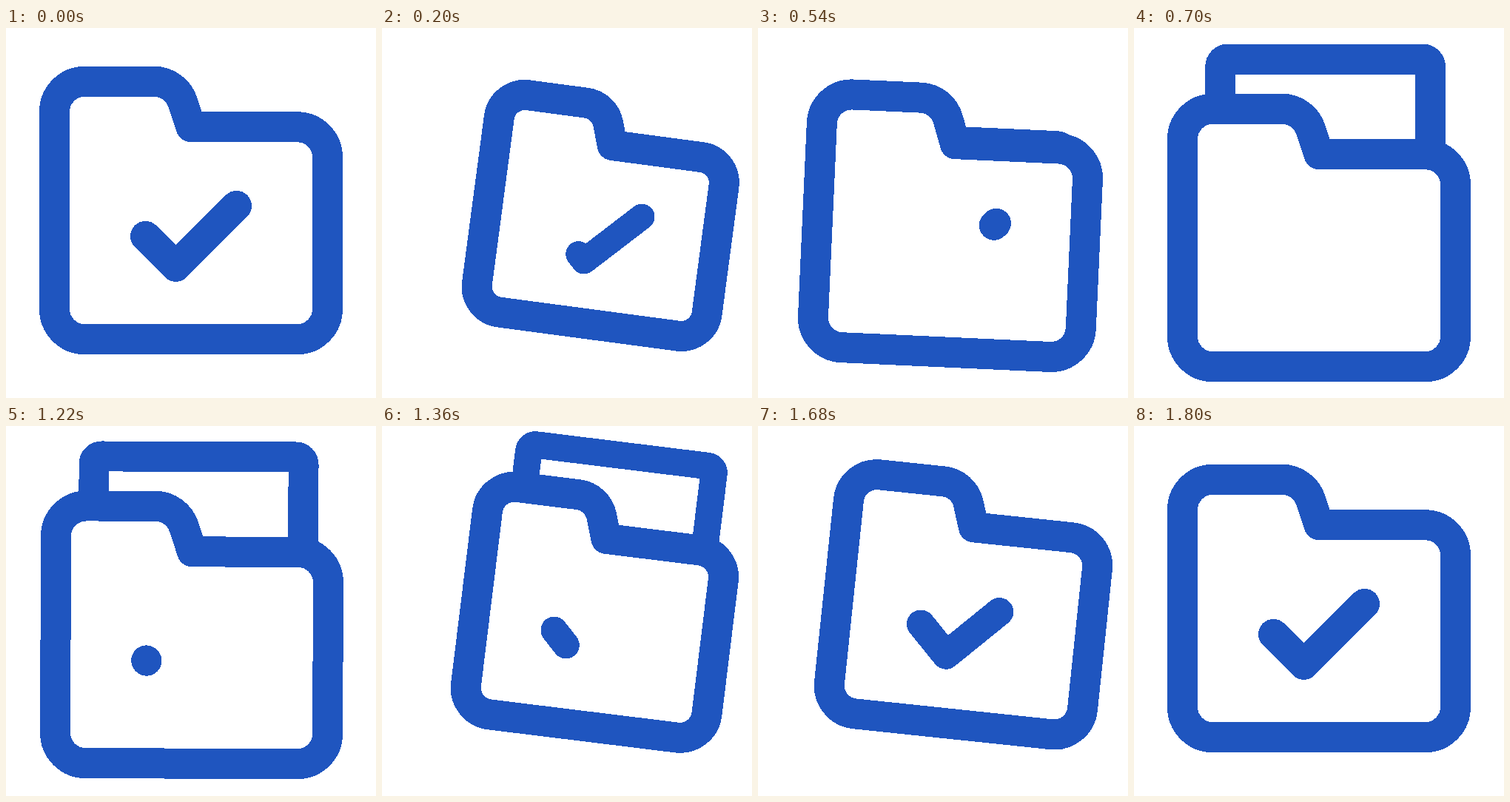
These frames come from a looping animation (500x500 px, 4.22 s). An HTML page:

```html
<!DOCTYPE html>
<html lang="en">
<head>
<meta charset="utf-8">
<title>Folder</title>
<style>
  html, body { margin: 0; width: 100%; height: 100%; overflow: hidden; background: #fff; }
  svg { display: block; width: 100%; height: 100%; }
  path { fill: none; stroke: #1f55bf; stroke-width: 2; stroke-linejoin: round; shape-rendering: crispEdges; }
</style>
</head>
<body>
<svg viewBox="0 0 500 500">
  <g id="icon">
    <path id="sheet" d="M5.5 5.7V.22a.5.5 0 0 1 .5-.5h12.84a.5.5 0 0 1 .5.5V5.7"/>
    <path id="folder" style="fill:#fff" d="M3 5a2 2 0 0 1 2-2h4.558a2 2 0 0 1 1.897 1.368L12 6h7a2 2 0 0 1 2 2v10a2 2 0 0 1-2 2H5a2 2 0 0 1-2-2z"/>
    <path id="tick" d="M9 13.2l2 2 4-4" pathLength="1" stroke-linecap="round"/>
  </g>
</svg>
<script>
const LOOP = 4220, CLOSE_AT = 1200, SWING = 600, UNIT = 20.5;
const [icon, sheet, folder, tick] =
  ['icon', 'sheet', 'folder', 'tick'].map(id => document.getElementById(id));

const clamp = x => Math.min(1, Math.max(0, x));
const sine = x => (1 - Math.cos(Math.PI * clamp(x))) / 2;
const ramp = (t, from, to) => sine((t - from) / (to - from));

// Cubic bezier easing, solved by bisection
const bezier = (x1, y1, x2, y2) => x => {
  const at = (u, a, b) => 3 * a * u * (1 - u) ** 2 + 3 * b * u * u * (1 - u) + u ** 3;
  let lo = 0, hi = 1;
  for (let i = 0; i < 24; i++) {
    const mid = (lo + hi) / 2;
    if (at(mid, x1, x2) < x) lo = mid; else hi = mid;
  }
  return at(lo, y1, y2);
};
const snap = bezier(.28, 0, .07, 1);

function draw(time) {
  const opening = time < CLOSE_AT;
  const t = opening ? time : time - CLOSE_AT;

  // Tilt and shrink around the bottom right corner, out and back
  const swing = clamp(Math.min(t, SWING - t) / (SWING / 2));
  const scale = 1 - .2 * sine(swing);
  const angle = 8 * snap(swing);

  const shift = 37 * (opening ? ramp(t, 410, 620) : 1 - ramp(t, 0, 210));
  const hidden = opening ? 1 - ramp(t, 410, 700) : ramp(t, 300, 600);
  const trim = ramp(t, 0, SWING);
  const start = opening ? trim : 0;
  const length = opening ? 1 - trim : trim;

  icon.setAttribute('transform',
    `translate(434.5 ${420.75 + shift}) rotate(${angle}) scale(${UNIT * scale}) translate(-21 -20)`);
  sheet.setAttribute('transform', `translate(0 ${10.6 * hidden})`);
  folder.style.strokeWidth = 2 / scale;
  tick.style.display = length > 0 ? '' : 'none';
  tick.style.strokeDasharray = length < 1 ? `${length} 2` : 'none';
  tick.style.strokeDashoffset = -start;
}

const origin = performance.now();
function frame() {
  draw((performance.now() - origin) % LOOP);
  requestAnimationFrame(frame);
}
frame();
</script>
</body>
</html>
```
